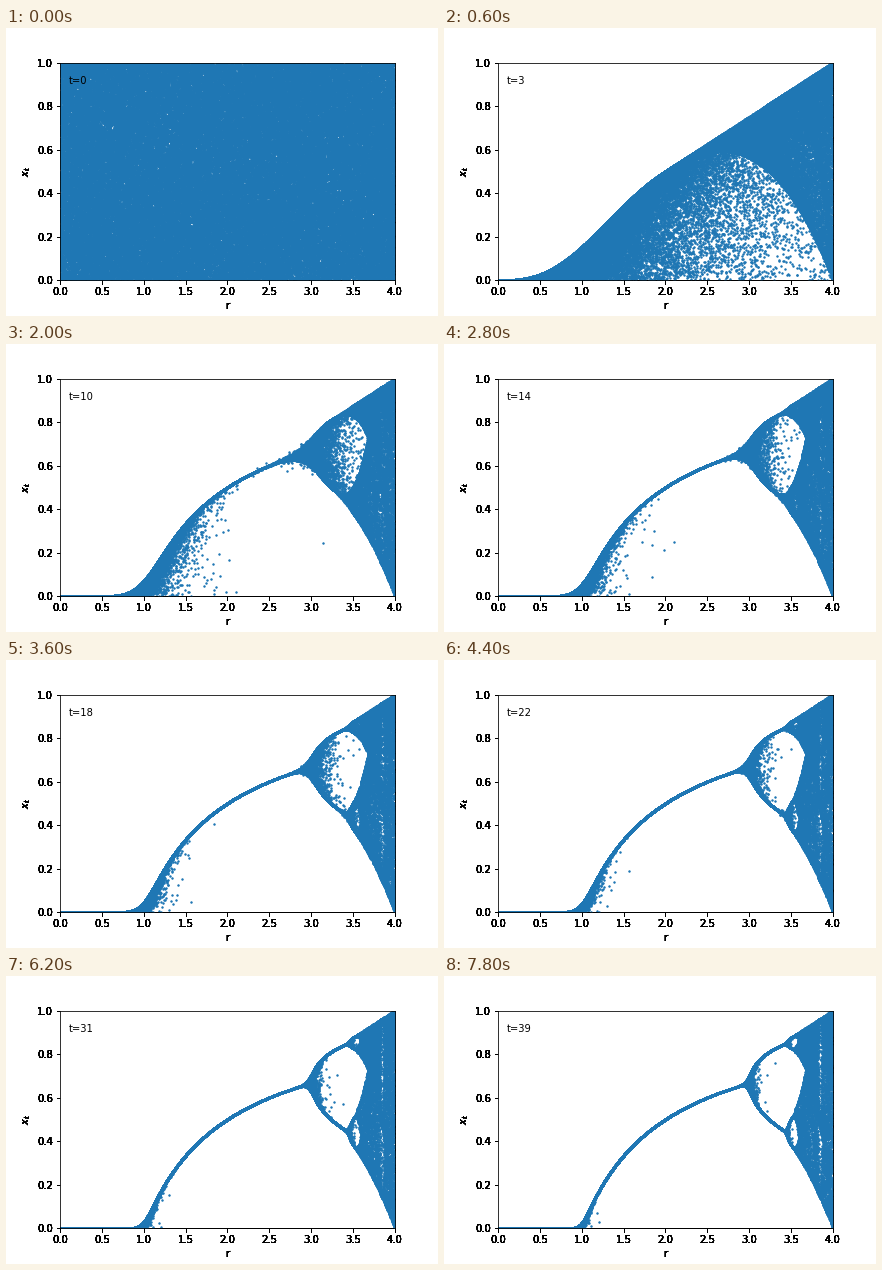
Recreate the animation shown at these times as a matplotlib script. Size 432 px wide and 288 px high, loop 8000 ms.

```python
import numpy as np
import matplotlib.pyplot as plt
from matplotlib.animation import FuncAnimation

STEPS = 40
POINTS = 100_000
LABEL_LAYERS = 10  # stacked axes give the heavy, hard-edged labels

plt.rcParams.update({"font.family": "DejaVu Sans", "font.size": 10})


def logistic_orbit(r, x, steps):
    """Return the population of every run at each time step."""
    orbit = [x]
    for _ in range(steps - 1):
        x = r * x * (1 - x)
        orbit.append(x)
    return orbit


def add_layer(fig):
    ax = fig.add_axes([0.125, 0.125, 0.775, 0.755])
    ax.set(xlim=(0, 4), ylim=(0, 1), xlabel="r", ylabel="$x_t$")
    return ax


rng = np.random.default_rng(7)
r = rng.uniform(0, 4, POINTS)
orbit = logistic_orbit(r, rng.uniform(0, 1, POINTS), STEPS)

fig = plt.figure(figsize=(6, 4), dpi=72, facecolor="white")
ax = [add_layer(fig) for _ in range(LABEL_LAYERS)][-1]
dots = ax.scatter(r, orbit[0], s=2, color="#1f77b4")
label = ax.text(0.1, 0.9, "t=0")


def update(t):
    dots.set_offsets(np.column_stack([r, orbit[t]]))
    label.set_text(f"t={t}")
    return dots, label


anim = FuncAnimation(fig, update, frames=STEPS, interval=200,
                     repeat=True, repeat_delay=0)
plt.show()
```
